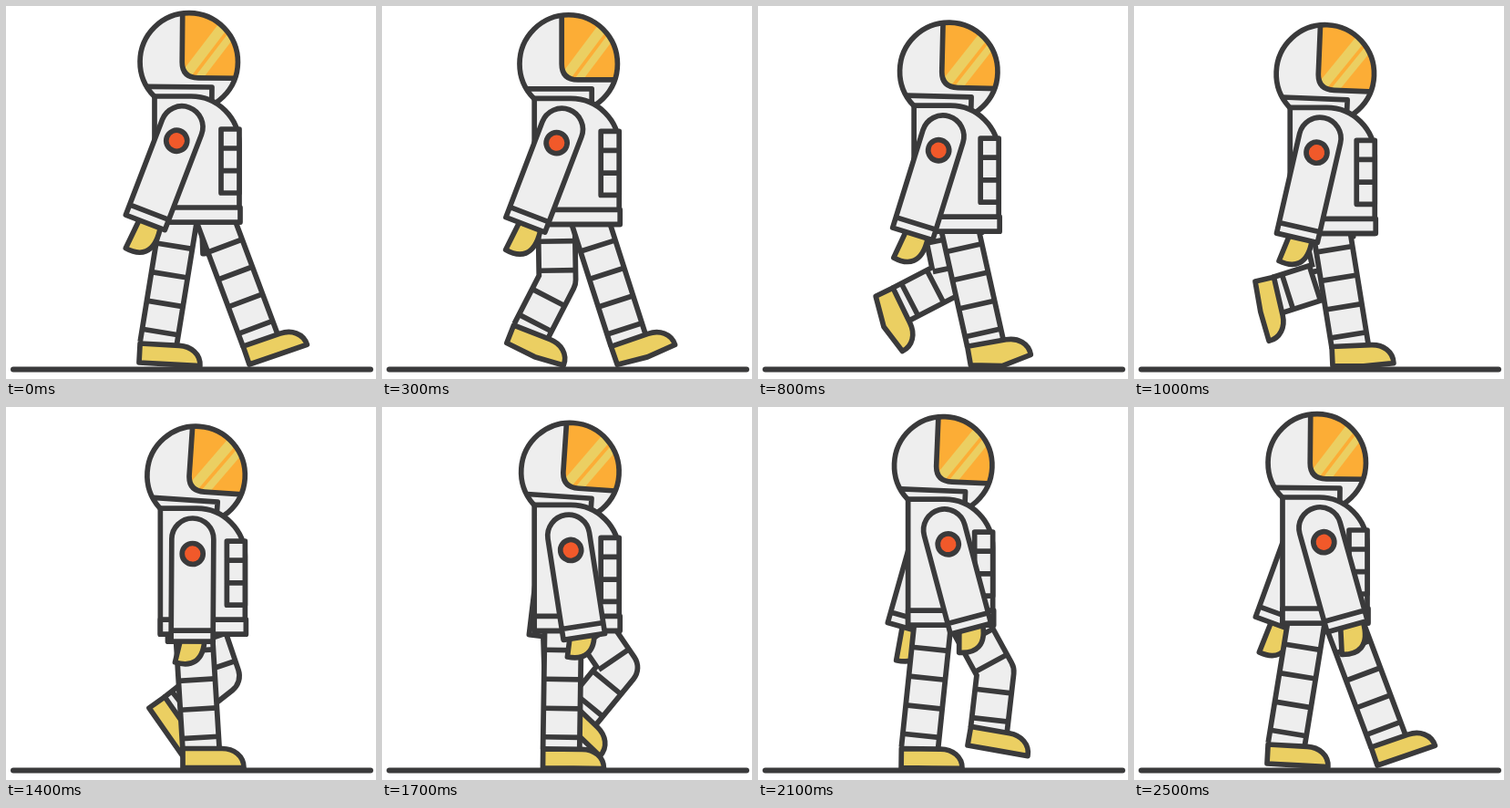
An HTML page that plays this animation: 406 px wide and 409 px high, repeating every 2600 ms.

```html
<!DOCTYPE html>
<html lang="en">
<head>
<meta charset="utf-8">
<title>Walking astronaut</title>
<style>
  html, body { margin: 0; width: 100%; height: 100%; overflow: hidden; background: #fff; }
  svg { display: block; width: 100%; height: 100%; }
  .ink { stroke: #3a3a3b; stroke-width: 5.7; stroke-linejoin: round; stroke-linecap: round; fill: none; }
  .suit { fill: #eee; }
  .gold { fill: #ebcf62; }
  .limb { fill: none; stroke-linejoin: round; }
</style>
</head>
<body>
<svg id="stage" viewBox="0 0 406 409" xmlns="http://www.w3.org/2000/svg"></svg>
<script>
const LOOP = 2600, STEP = 100, STRIDE = 2500;
const THIGH = 73, SHIN = 64;

// Heel path: phase, x, y, turn. Planted up to phase 1, then swinging forward.
const HEEL = [
  [0, 267, 393, -19], [0.24, 247, 393.5, -17], [0.4, 218, 394.5, -2.5],
  [0.56, 194, 395.5, 0], [0.8, 161, 395.5, 1], [1, 146, 391, 3],
  [1.24, 130, 342, 45], [1.4, 133, 302, 77], [1.56, 157, 330, 55],
  [1.76, 214, 343, 34], [1.84, 230, 371, 10], [2, 267, 393, -19]];

const armMarkup = (id, badge) => `
  <g id="${id}">
    <path id="${id}Hand" class="ink gold" d="M9 -40 L0 0 C17 5 32 0 32 -28 V-40"/>
    <path class="ink suit" d="M-23 112 V0 A23 23 0 0 1 23 0 V112 Z M-23 100 H23"/>
    ${badge}
  </g>`;

const legMarkup = id => `
  <path id="${id}Edge" class="limb" stroke="#3a3a3b" stroke-width="46"/>
  <path id="${id}Fill" class="limb" stroke="#eee" stroke-width="34.4"/>
  <path id="${id}Bands" class="ink" style="stroke-linecap:butt"/>
  <path id="${id}Foot" class="ink gold"/>`;

const visor = "M193 0 V61 Q193 78.5 211 78.5 H262";

document.getElementById("stage").innerHTML = `
  <defs>
    <clipPath id="helmet"><circle cx="200.5" cy="61" r="53.7"/></clipPath>
    <clipPath id="glass"><path d="${visor} V0 Z"/></clipPath>
  </defs>
  <path class="ink" style="stroke-width:6" d="M8 398.5 H400"/>
  ${armMarkup("farArm", "")}
  ${legMarkup("farLeg")}
  ${legMarkup("nearLeg")}
  <g id="head">
    <circle class="suit" cx="200.5" cy="61" r="53.7"/>
    <g clip-path="url(#helmet)">
      <path fill="#fcad36" d="${visor} V0 Z"/>
      <g clip-path="url(#glass)" stroke="#ebcf62">
        <path stroke-width="11" d="M193 81 L247 9"/>
        <path stroke-width="8" d="M208 83 L259 15"/>
      </g>
      <path class="ink" d="${visor}"/>
    </g>
    <circle class="ink" cx="200.5" cy="61" r="53.7"/>
    <path class="ink" d="M155 88.5 H226 V104"/>
  </g>
  <g id="body">
    <path class="ink suit" d="M163 99 H203 A53 53 0 0 1 256 152 V237 H163 Z"/>
    <path class="ink suit" d="M163 221 H257 V237 H163 Z"/>
    <path class="ink suit" d="M236 135 H256 V205 H236 Z M236 156 H256 M236 180.7 H256"/>
  </g>
  ${armMarkup("nearArm", '<circle class="ink" style="fill:#f1592a" cy="16" r="11.5"/>')}`;

const { sin, cos, PI, hypot, sqrt, max } = Math;
const set = (id, name, value) => document.getElementById(id).setAttribute(name, value);
const mix = (a, b, u) => a + (b - a) * u;
const ease = u => u * u * (3 - 2 * u);

// Smooth curve through rows of [phase, ...values]
function follow(rows, phase) {
  const last = rows.length - 1;
  let i = 0;
  while (i < last - 1 && phase >= rows[i + 1][0]) i++;
  const [p, q] = [rows[i], rows[i + 1]];
  const span = q[0] - p[0], u = (phase - p[0]) / span;
  const slope = (k, c) => {
    const a = rows[max(0, k - 1)], b = rows[k < last ? k + 1 : last];
    return (b[c] - a[c]) / (b[0] - a[0]) * span;
  };
  return [1, 2, 3].map(c => {
    const m = slope(i, c), n = slope(i + 1, c), d = q[c] - p[c];
    return p[c] + u * (m + u * (3 * d - 2 * m - n + u * (m + n - 2 * d)));
  });
}

// Forward-bending knee; a leg at full reach stays straight
function bendKnee([hx, hy], [ax, ay]) {
  const dist = hypot(ax - hx, ay - hy);
  const ux = (ax - hx) / dist, uy = (ay - hy) / dist;
  const straight = dist >= THIGH + SHIN;
  const along = straight ? dist * THIGH / (THIGH + SHIN)
    : (dist * dist + THIGH * THIGH - SHIN * SHIN) / (2 * dist);
  const out = straight ? 0 : sqrt(max(0, THIGH * THIGH - along * along));
  return [hx + ux * along + uy * out, hy + uy * along - ux * out];
}

function band([ax, ay], [bx, by], dist) {
  const len = hypot(bx - ax, by - ay);
  const dx = (bx - ax) / len, dy = (by - ay) / len;
  const x = ax + dx * dist, y = ay + dy * dist, half = 20;
  return `M${x - dy * half} ${y + dx * half} L${x + dy * half} ${y - dx * half}`;
}

function drawLeg(id, phase, bob) {
  const [x, y, turn] = follow(HEEL, phase);
  const r = turn * PI / 180, c = cos(r), s = sin(r);
  const lift = 10 * max(0, -sin(PI * phase));
  const hip = [209 + 19 * cos(PI * phase), 230 + 0.45 * bob - lift];
  const ankle = [x + 20 * c + 21 * s, y + 20 * s - 21 * c];
  const knee = bendKnee(hip, ankle);
  const toe = 9 * max(0, sin(2 * PI * phase)) ** 3;
  const line = `M${hip} L${knee} L${ankle}`;
  set(id + "Edge", "d", line);
  set(id + "Fill", "d", line);
  set(id + "Bands", "d", [42.5, 10.5].map(d => band(knee, hip, d)).join("") +
    [21.5, 53].map(d => band(knee, ankle, d)).join(""));
  set(id + "Foot", "d", `M0 -21 L0 0 L34 ${toe} L67 0 C67 -13 56 -21 43 -21 Z`);
  set(id + "Foot", "transform", `translate(${x} ${y}) rotate(${turn})`);
}

function drawArm(id, x, y, swing, handX, handY, turn) {
  set(id, "transform", `translate(${x} ${y}) rotate(${swing})`);
  set(id + "Hand", "transform", `translate(${handX} ${handY}) rotate(${turn})`);
}

function draw(now) {
  const p = Math.floor(now % LOOP / STEP) * STEP / STRIDE;
  const sway = 7.3 * sin(PI * p) + 2.2 * sin(2 * PI * p);
  const bob = 13 * sin(PI * p) ** 2 + sin(2 * PI * p);
  const tilt = 2 - 2 * cos(2 * PI * (p - 0.12));
  const nod = 0.45 * tilt;
  set("body", "transform", `translate(${sway} ${bob})`);
  set("head", "transform",
    `translate(${sway + nod} ${bob + nod}) rotate(${tilt} 200.5 61)`);

  // The wrists flex late in the stride
  const flex = sin(PI * p * p) ** 2, shoulder = bob + 132.8;
  drawArm("nearArm", sway + mix(193, 204, ease(p ** 1.2)), shoulder,
    mix(21, -15.6, ease(ease(p ** 1.1))),
    mix(-10, -14, p) - 9 * flex, mix(146, 140, p) - 11 * flex, mix(-8, 0, p) + 6 * flex);
  drawArm("farArm", sway + 193.3, shoulder,
    mix(-15, 20, ease(p ** 1.4)),
    mix(-14, -6, p) + 7 * flex, mix(140, 147, p) + 5 * flex, mix(0, -11, p) - 14 * flex);

  drawLeg("farLeg", 1 + p, bob);
  drawLeg("nearLeg", p, bob);
}

function tick() {
  draw(performance.now());
  requestAnimationFrame(tick);
}
tick();
</script>
</body>
</html>
```
